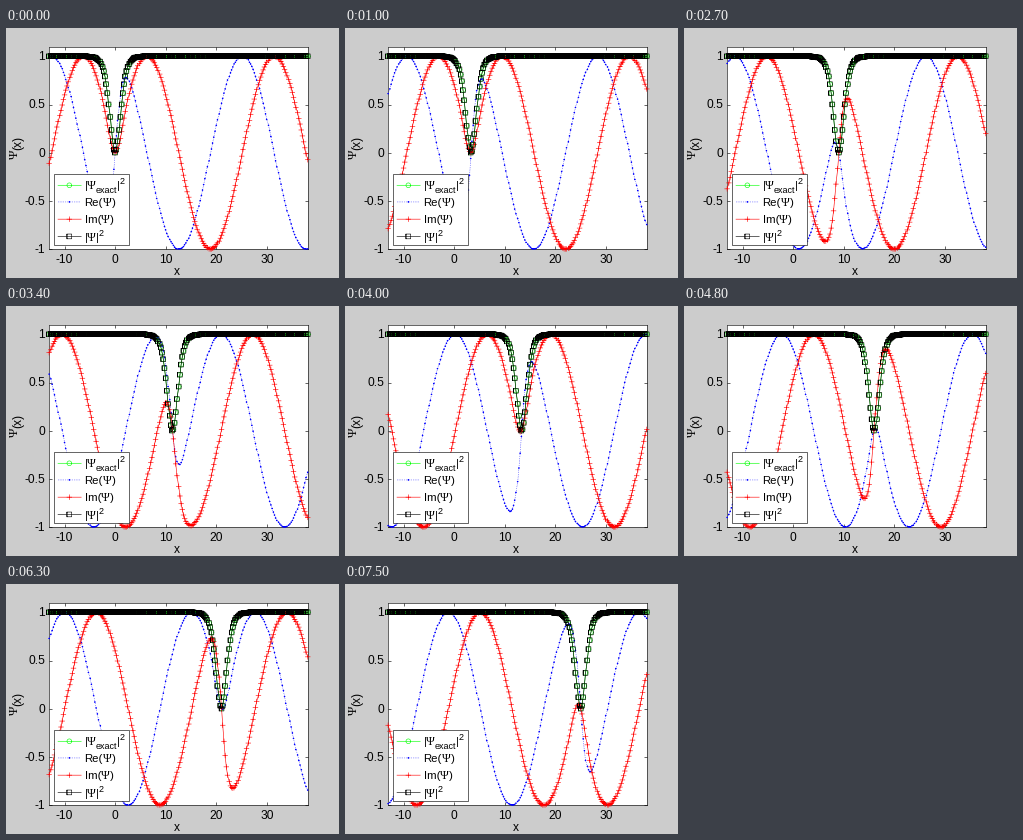
Write a matplotlib script that moves like this. It is 333 by 250 pixels and loops after 7.6 s.

```python
import numpy as np
import matplotlib.pyplot as plt
from matplotlib.animation import FuncAnimation
from matplotlib.patches import Rectangle

W, H, DPI = 333, 250, 100
PX = 72 / DPI  # points per pixel
CELL = W / 560  # the plot is laid out on a finer grid, 560 cells wide
FRAMES, INTERVAL = 76, 100
T_END = 50.0
K = 0.25  # carrier wave number; the dip travels at 2K

plt.rcParams["font.family"] = "Liberation Sans"
plt.rcParams["path.simplify"] = False

# Plot area, in pixels from the top left
LEFT, RIGHT, TOP, BOTTOM = 43.4, 301.5, 18.7, 221
x = np.linspace(-13, 38, 205)


def to_px(v):
    return LEFT + (v + 13) * (RIGHT - LEFT) / 51


def to_py(v):
    return BOTTOM - (v + 1) * (BOTTOM - TOP) / 2.1


def snap(p):
    return CELL * (np.floor(p / CELL) + 0.5)


def soliton(t):
    """Dark soliton of i psi_t + psi_xx = |psi|^2 psi."""
    envelope = np.tanh((x - 2 * K * t) / np.sqrt(2))
    return envelope * np.exp(1j * (K * x - (K**2 + 1) * t))


def curves(t):
    psi = soliton(t)
    density = np.abs(psi) ** 2
    return density, psi.real, psi.imag, density


# Marker outlines as complex offsets; a nan lifts the pen
NAN = complex(np.nan, np.nan)
cross = np.array([-1, 1, NAN, -1j, 1j, NAN])
box = np.array([-1 - 1j, 1 - 1j, 1 + 1j, -1 + 1j, -1 - 1j, -1 + 1j, NAN])
ring = np.append(np.exp(2j * np.pi * np.arange(17) / 16), NAN)

STYLES = [
    ("#00ff00", "-", 4 * ring),
    ("#0000ff", (0, (1, 2)), cross),
    ("#ff0000", "-", 4 * cross),
    ("#000000", "-", 4 * box),
]

fig = plt.figure(figsize=(W / DPI, H / DPI), dpi=DPI, facecolor="0.8")
ax = fig.add_axes([LEFT / W, 1 - BOTTOM / H, (RIGHT - LEFT) / W, (BOTTOM - TOP) / H])
ax.set(xlim=(-13, 38), ylim=(-1, 1.1))
ax.set_xticks(range(-10, 31, 10), [])
ax.set_yticks([-1, -0.5, 0, 0.5, 1], [])
ax.tick_params(direction="in", top=True, right=True, length=2.6 * PX,
               width=CELL * PX)
for spine in ax.spines.values():
    spine.set_linewidth(CELL * PX)

# Pixel-space layer for curves, labels and legend
page = fig.add_axes([0, 0, 1, 1], zorder=5)
page.set(xlim=(0, W), ylim=(H, 0))
page.axis("off")


class Curve:
    """A line and its markers, placed in pixels."""

    def __init__(self, color, ls, outline, zorder):
        pen = dict(color=color, lw=CELL * PX, zorder=zorder, snap=False)
        self.outline = CELL * outline
        self.line, = page.plot([], [], ls=ls, **pen)
        self.marks, = page.plot([], [], solid_capstyle="projecting",
                                solid_joinstyle="miter", **pen)

    def place(self, px, py, at=None):
        px, py = snap(np.asarray(px)), snap(np.asarray(py))
        self.line.set_data(px, py)
        centres = px + 1j * py if at is None else np.array([at])
        z = (centres[:, None] + self.outline).ravel()
        self.marks.set_data(z.real, z.imag)


def label(px, py, s, size=12, **kw):
    kw = {"ha": "left", "va": "baseline", "zorder": 8, **kw}
    return page.text(px, py, s, fontsize=size * PX, **kw)


def psi_label(px, py, size=12, **kw):
    label(px, py, "Ψ", size, family="Liberation Serif", **kw)


plots = [Curve(*s, zorder=3) for s in STYLES]

for v in range(-10, 31, 10):
    label(to_px(v), 235, str(v), ha="center")
for v in (-1, -0.5, 0, 0.5, 1):
    label(39, to_py(v) + 4, f"{v:g}", ha="right")
label(171, 247, "x", ha="center")
psi_label(15, 132, 13, rotation=90, va="bottom", ha="right")
label(15, 122, "(x)", rotation=90, rotation_mode="anchor")

# Legend
page.add_patch(Rectangle((47.5, 145.5), 75, 71.5, fc="white", ec="black",
                         lw=CELL * PX, zorder=6))
rows = [157 + 17.2 * i for i in range(4)]
for y, s in zip(rows, STYLES):
    Curve(*s, zorder=7).place([52, 75.5], [y, y], at=snap(63.5) + 1j * snap(y))

base = [y + 4 for y in rows]
TEXT, SMALL = 11.4, 9
label(78.5, base[0], "|", TEXT)
psi_label(81, base[0])
label(90, base[0] + 4, "exact", SMALL)
label(111, base[0], "|", TEXT)
label(114, base[0] - 5, "2", SMALL)
for y, name, end in zip(base[1:3], ("Re", "Im"), (96.5, 94.5)):
    label(78.5, y, name + "(", TEXT)
    psi_label(end, y)
    label(end + 9, y, ")", TEXT)
label(78.5, base[3], "|", TEXT)
psi_label(81, base[3])
label(90, base[3], "|", TEXT)
label(93, base[3] - 5, "2", SMALL)


def update(i):
    for plot, y in zip(plots, curves(T_END * i / (FRAMES - 1))):
        plot.place(to_px(x), to_py(y))
    return []


anim = FuncAnimation(fig, update, frames=FRAMES, interval=INTERVAL,
                     repeat=True, repeat_delay=0, blit=False)
plt.show()
```
